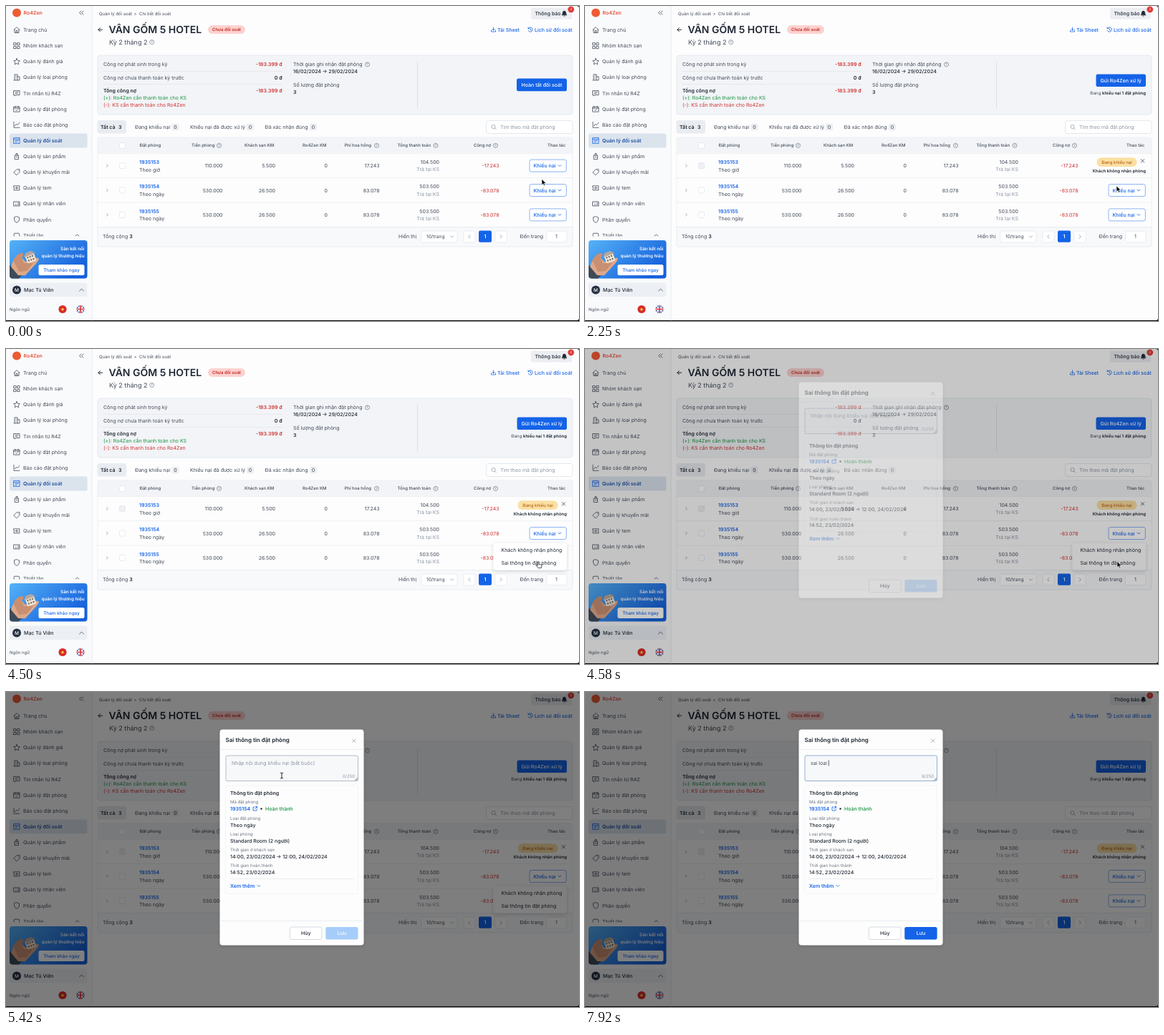
Write an HTML page that moves like this. It is 800 px wide and 441 px high and loops after 8000 ms.

```html
<!DOCTYPE html>
<html lang="vi">
<head>
<meta charset="utf-8">
<style>
html, body { margin: 0; width: 100%; height: 100%; overflow: hidden; background: #000; }
svg { display: block; width: 100%; height: 100%; }
text { font-family: Inter, "Noto Sans", sans-serif; white-space: pre; text-rendering: geometricPrecision; }
</style>
</head>
<body>
<svg id="stage" viewBox="0 0 800 441"></svg>
<script>
const INK = '#424a57', DARK = '#1f2733', BLUE = '#1463e8', RED = '#d0302f',
      GREY = '#8c95a3', GREEN = '#16913d', LINE = '#e1e5ea', SOFT = '#f2f4f7';

// Drawing helpers: each returns SVG markup. Text y is the middle of the capitals.
const text = (x, y, s, fill = INK, weight = 400, size = 7, anchor = 'start') =>
  `<text x="${x}" y="${y + size * .36}" fill="${fill}" font-weight="${weight}" font-size="${size}" text-anchor="${anchor}">${s}</text>`;
const right = (x, y, s, fill, weight, size) => text(x, y, s, fill, weight, size, 'end');
const mid = (x, y, s, fill, weight, size) => text(x, y, s, fill, weight, size, 'middle');
const bold = s => `<tspan font-weight="600" fill="${DARK}">${s}</tspan>`;
const box = (x1, y1, x2, y2, fill, stroke = 'none', r = 2.5, id) =>
  `<rect ${id ? `id="${id}"` : ''} x="${x1}" y="${y1}" width="${x2 - x1}" height="${y2 - y1}" rx="${r}" fill="${fill}" stroke="${stroke}" stroke-width=".7"/>`;
const path = (d, stroke = INK, w = .8, fill = 'none') =>
  `<path d="${d}" stroke="${stroke}" stroke-width="${w}" fill="${fill}" stroke-linecap="round" stroke-linejoin="round"/>`;
const shape = (d, fill) => path(d, 'none', 0, fill);
const dot = (x, y, r, fill, stroke = 'none') =>
  `<circle cx="${x}" cy="${y}" r="${r}" fill="${fill}" stroke="${stroke}" stroke-width=".7"/>`;
const at = (x, y, s, turn = 0) => `<g transform="translate(${x} ${y}) rotate(${turn})">${s}</g>`;
const group = (id, s) => `<g id="${id}">${s}</g>`;
const shaded = s => `<g filter="url(#shade)">${s}</g>`;
const down = (x, y, c = INK) => path(`M${x - 2} ${y - 1}l2 2 2-2`, c);
const cross = (x, y, c = INK, r = 2.2) => path(`M${x - r} ${y - r}l${2 * r} ${2 * r}m0 ${-2 * r}l${-2 * r} ${2 * r}`, c, .7);
const help = (x, y) => dot(x, y, 3, 'none', '#6b7482') + mid(x, y, '?', '#6b7482', 500, 4.5);
const hline = (x1, x2, y, c = LINE) => path(`M${x1} ${y}H${x2}`, c, .7);

const MENU = [
  ['Trang chủ', 'M-4 0L0-4 4 0M-3-1V4H3V-1M-1 4V1H1V4'],
  ['Nhóm khách sạn', 'M-4-4h3v3h-3zM1-4h3v3h-3zM-4 1h3v3h-3zM1 1h3v3h-3z'],
  ['Quản lý đánh giá', 'M0-4.3L1.3-1.5 4.3-1.1 2.1 1 2.7 4 0 2.6-2.7 4-2.1 1-4.3-1.1-1.3-1.5Z'],
  ['Quản lý loại phòng', 'M-3 4V-4H1V4M1-1H4V4H-4M-1-2v0M-1 0v0M-1 2v0'],
  ['Tin nhắn từ R4Z', 'M-4-3.5H4V2.5H-1L-3 4V2.5H-4ZM-2-1.5H2M-2 .5H1'],
  ['Quản lý đặt phòng', 'M-4-3H4V4H-4ZM-4-1H4M-2-4v2M2-4v2M-1.5 1.5l1 1 2-2'],
  ['Báo cáo đặt phòng', 'M-4-4V4H4M-2.5 1.5L-.5-1 1 .5 4-3'],
  ['Quản lý đối soát', 'M-4-4H4V4H-4ZM-4-1.8H4M-2 0H2M-2 2H0'],
  ['Quản lý sản phẩm', 'M-2.5-1.5H2.5V4H-2.5ZM-1-1.5V-4H1V-1.5M-1 1H1'],
  ['Quản lý khuyến mãi', 'M-4 0L0-4H4V0L0 4ZM2-2v0'],
  ['Quản lý tem', 'M-4-3H4V-1A1 1 0 0 0 4 1V3H-4V1A1 1 0 0 0-4-1ZM-1.5 0h3M0-1.5v3'],
  ['Quản lý nhân viên', 'M-4-3H4V3H-4ZM-2 1.5Q-1-.5 0 1.5M-1-1v0M1.5-1H3M1.5 1H3'],
  ['Phân quyền', 'M0-4.3L3.5-3V0Q3.5 3 0 4.3-3.5 3-3.5 0V-3Z'],
  ['Thiết lập', 'M-3-3H3L4 0 3 3H-3L-4 0Z']
];

function banner() {
  const windows = [-4.5, -1, 2.5].map(x => box(x, 1, x + 1.8, 3.2, '#6b625e', 'none', 0) + box(x, 5.5, x + 1.8, 7.7, '#6b625e', 'none', 0)).join('');
  const house = box(-6.5, -1, 6.5, 10, '#efe3d3', 'none', 0) + shape('M-8.5 0L-4-5H4L8.5 0Z', '#b9a79b') + windows;
  return box(5, 328, 113.5, 381.5, 'url(#sky)', 'none', 4) +
    shape('M5 364L13 361 23 376 18 381.5H9Q5 381 5 377Z', '#3f4a58') +
    shape('M7 365Q10 352 20 350L27 358 39 354Q45 351 46 354 45 358 38 365L27 377 17 377Z', '#dda88a') +
    at(33, 349, house, -20) + shape('M10 356Q16 345 23 346 26 347 22 353L25 360 38 360 29 371 18 372Z', '#c98f72') +
    right(109.5, 340, 'Sàn kết nối', '#fff', 600, 6.3) +
    right(109.5, 350, 'quản lý thương hiệu', '#fff', 600, 6.3) +
    box(45.5, 362, 109.5, 377, '#fff') + mid(77.5, 369.5, 'Tham khảo ngay', BLUE, 500, 6.4);
}

function sidebar() {
  let s = box(0, 0, 120, 440, '#f9fafb', 'none', 0) + path('M120 0V440', LINE) +
    dot(15, 9.5, 6, '#ee5a33') + text(24.5, 9.5, 'Ro4Zen', '#e5533d', 600) +
    path('M105 7l-2.5 2.5 2.5 2.5M108 7l-2.5 2.5 2.5 2.5') +
    box(5, 178.5, 113.5, 198.5, '#dbe3ed');
  MENU.forEach(([label, icon], i) => {
    const y = 33.5 + i * 22.13, on = i == 7;
    s += at(15, y, path(icon, on ? BLUE : INK)) + text(24, y, label, on ? '#1c4f9f' : INK, on ? 600 : 400);
  });
  return s + path('M97 322l2.5-2 2.5 2') + box(1, 322.5, 119, 328, '#f9fafb', 'none', 0) + banner() +
    box(5, 387.5, 113.5, 407, '#eceff4', 'none', 3) + dot(15, 397.5, 6, '#253040') +
    mid(15, 397.5, 'M', '#fff', 500, 6.5) + text(25, 397.5, 'Mạc Tú Viên', DARK, 500) +
    path('M102.5 399l3-3 3 3') + text(5, 425, 'Ngôn ngữ', INK, 400, 6) +
    dot(79, 424.5, 5.6, '#d92b2b') + shape('M79 422.2l.7 1.6 1.7.1-1.3 1.1.4 1.7-1.5-.9-1.5.9.4-1.7-1.3-1.1 1.7-.1Z', '#ffdc3c') +
    dot(104, 424.5, 5.6, '#2b4ea2') + path('M100.5 421l7 7m0-7l-7 7', '#fff', 1.6) +
    path('M104 419.5v10m-5-5h10', '#fff', 3) + path('M104 419.5v10m-5-5h10', '#d9313c', 1.6);
}

function header() {
  return text(130, 11, 'Quản lý đối soát', INK, 400, 6) + text(178.5, 11, '&gt;', INK, 400, 6) +
    text(186, 11, 'Chi tiết đối soát', INK, 400, 6) +
    box(733, 2.5, 790, 18.5, '#eceef2') + text(738.5, 10.7, 'Thông báo', DARK, 500) +
    path('M776.3 12.5Q777.3 11.5 777.3 9.5 777.3 7 779.5 7 781.7 7 781.7 9.5 781.7 11.5 782.7 12.5ZM778.7 14h1.6', DARK, .7, DARK) +
    dot(788.8, 4.8, 4.4, '#e23b35') + mid(788.8, 4.8, '2', '#fff', 400, 4.5) +
    path('M134.5 33.2h-5.5m2.5-2.6l-2.6 2.6 2.6 2.6', DARK, 1) +
    text(143.5, 33, 'VÂN GỐM 5 HOTEL', DARK, 600, 14) +
    box(282, 27, 334, 39, '#fbd2d0', 'none', 6) + mid(308, 33, 'Chưa đối soát', '#c9291f', 600, 6) +
    text(144, 50.3, 'Kỳ 2 tháng 2', INK, 400, 9) + help(203.7, 50.5) +
    path('M680.5 30v4m-1.8-1.7l1.8 1.8 1.8-1.8M677.5 34v2h6v-2', BLUE) + text(686, 33.2, 'Tải Sheet', BLUE, 500) +
    path('M729.5 31.2A3.2 3.2 0 1 1 729.3 34.5M729 29.8v1.8h1.8M732.3 31.5v2l1.3.8', BLUE) +
    text(738, 33.2, 'Lịch sử đối soát', BLUE, 500);
}

function summary() {
  return box(128, 69, 791, 152, SOFT, '#dce2e9', 4) +
    text(136, 81.6, 'Công nợ phát sinh trong kỳ') + right(385.5, 81.6, '-183.399 đ', RED, 600) + hline(136, 385, 91.5) +
    text(136, 100.2, 'Công nợ chưa thanh toán kỳ trước') + right(385.5, 100.2, '0 đ', DARK, 600) + hline(136, 385, 109.5) +
    text(136, 118.7, 'Tổng công nợ', DARK, 600) + right(385.5, 118.7, '-183.399 đ', RED, 600) +
    text(136, 128.7, '(+): Ro4Zen cần thanh toán cho KS', GREEN) +
    text(136, 138.7, '(-): KS cần thanh toán cho Ro4Zen', RED) +
    text(401, 81.6, 'Thời gian ghi nhận đặt phòng') + help(504.5, 81.8) +
    text(401, 91.9, '16/02/2024 → 29/02/2024', DARK, 500) +
    text(401, 110.3, 'Số lượng đặt phòng') + text(401, 120.2, '3', DARK, 600) +
    path('M574.5 78V143', '#d5dbe3', .8) +
    group('finish', box(713, 101.5, 783, 119.2, BLUE) + mid(748, 110.3, 'Hoàn tất đối soát', '#fff', 500)) +
    group('send', box(713.5, 95.5, 783, 113, BLUE) + mid(748.2, 104.3, 'Gửi Ro4Zen xử lý', '#fff', 500) +
      right(783, 121.5, 'Đang ' + bold('khiếu nại 1 đặt phòng'), INK, 400, 6));
}

function tabs() {
  const tab = (x, label, n) => text(x, 169.5, label) + box(n - 5, 164.5, n + 5, 174.5, '#eceef2') + mid(n, 169.5, '0');
  return box(127.5, 160, 168, 178.5, '#e9ecf0', 'none', 3) +
    text(132, 169.5, 'Tất cả', DARK, 600) + text(157, 169.5, '3', DARK, 600) +
    tab(180, 'Đang khiếu nại', 236.5) + tab(257, 'Khiếu nại đã được xử lý', 341) + tab(361.5, 'Đã xác nhận đúng', 429) +
    box(670.5, 160.5, 791, 178.5, '#fff', '#d9dee5', 3) + dot(680.5, 169, 2.6, 'none', GREY) +
    path('M682.5 171l1.8 1.8', GREY) + text(690, 169.5, 'Tìm theo mã đặt phòng', GREY);
}

const rowY = i => 223.6 + i * 34.4;
const action = (y, id) => box(731, y - 8.5, 782.3, y + 8.5, '#fff', '#5b93f0', 2.5, id) +
  text(736.5, y, 'Khiếu nại', BLUE, 500) + down(773, y, BLUE);
const check = (y, id) => box(158.5, y - 4, 166.5, y + 4, '#fff', '#dfe4ea', 1.5, id);

function row(i, id, kind, price, promo, fee, total, debt) {
  const y = rowY(i);
  const fields = [[302.5, price], [376, promo], [449, '0'], [521.5, fee]].map(([x, s]) => right(x, y, s)).join('');
  return box(128.4, y - 16.8, 790.6, y + 17.2, '#fdfdfe', 'none', 0, 'row' + i) + hline(128, 791, y + 17.2) +
    path(`M140.5 ${y - 1.8}l1.8 1.8-1.8 1.8`, GREY) + check(y, 'check' + i) +
    text(186, y - 5.1, id, BLUE, 600) + text(186, y + 5.4, kind) + fields +
    right(605, y - 5.1, total) + right(605, y + 5, 'Trả tại KS', GREY) + right(688.5, y, debt, RED) +
    group('act' + i, action(y, 'btn' + i));
}

function table() {
  const heads = [[186.5, 'Đặt phòng'], [259, 'Tiền phòng', 297.5], [333, 'Khách sạn KM'], [414, 'Ro4Zen KM'],
    [472.5, 'Phí hoa hồng', 517.5], [546.5, 'Tổng thanh toán', 600], [653, 'Công nợ', 683.5], [756, 'Thao tác']];
  const page = (x, d) => box(x, 315, x + 16, 331, '#fff', LINE) + path(d, GREY);
  return box(128, 184, 791, 337, '#f8f9fb', LINE, 3) + box(128.4, 184.4, 790.6, 207, SOFT, 'none', 2) + hline(128, 791, 206.8) +
    check(195.5) + heads.map(([x, s, q]) => text(x, 195.3, s, INK, 500, 6) + (q ? help(q, 195.3) : '')).join('') +
    row(0, '1935153', 'Theo giờ', '110.000', '5.500', '17.243', '104.500', '-17.243') +
    row(1, '1935154', 'Theo ngày', '530.000', '26.500', '83.078', '503.500', '-83.078') +
    row(2, '1935155', 'Theo ngày', '530.000', '26.500', '83.078', '503.500', '-83.078') +
    group('claimed', box(714.5, 212.3, 770.5, 225, '#fbe0a3', 'none', 6) + mid(742.5, 218.5, 'Đang khiếu nại', '#b8621b', 500, 6) +
      cross(778.5, 216.8, DARK) + right(783, 230.5, 'Khách không nhận phòng', DARK, 600, 6)) +
    text(135, 322.7, 'Tổng cộng ' + bold('3')) + text(548, 322.7, 'Hiển thị') +
    box(579.5, 315, 630, 331, '#fff', LINE) + text(587, 322.7, '10/trang', INK, 400, 6.6) + down(622.5, 323, GREY) +
    page(639, 'M648 320.5l-2.3 2.3 2.3 2.3') + box(660, 314.5, 678, 330.7, BLUE, 'none', 2) + mid(669, 322.7, '1', '#fff', 600) +
    page(683, 'M690 320.5l2.3 2.3-2.3 2.3') + text(717.5, 322.7, 'Đến trang') +
    box(754.5, 315.3, 783, 330.5, '#fff', LINE) + mid(768.5, 322.7, '1');
}

const menu = shaded(box(680.5, 237.5, 783, 275, '#fff', 'none', 3)) +
  text(691.5, 247.3, 'Khách không nhận phòng', DARK) + text(691.5, 265.5, 'Sai thông tin đặt phòng', DARK);

function dialog() {
  const field = (y, label, value) => text(313, y, label, '#6b7482', 400, 6) + text(313, y + 9.4, value, DARK, 500);
  return shaded(box(298.5, 52.5, 499.5, 354.5, '#fdfdfd', 'none', 4)) +
    text(306.5, 66.7, 'Sai thông tin đặt phòng', DARK, 600, 8) + cross(485.7, 68.2, GREY) + hline(298.5, 499.5, 80.5) +
    box(307, 89, 491.5, 124.5, '#f6f8fa', '#97a1af', 2, 'area') +
    `<text id="note" x="315" y="102" font-size="7"></text>` + box(315, 95.5, 315.7, 103.5, DARK, 'none', 0, 'caret') +
    `<text id="count" x="487" y="120.2" font-size="6" fill="${GREY}" text-anchor="end"></text>` +
    path('M487.5 123.5l3-3m-1 3l1-1', DARK, .6) +
    box(306.5, 131, 491.5, 282.5, 'none', '#eef0f3', 3) + text(313, 141.3, 'Thông tin đặt phòng', DARK, 600) +
    field(154, 'Mã đặt phòng', `<tspan fill="${BLUE}" font-weight="600">1935154</tspan>`) +
    path('M347 161h-2v5h5v-2M347.5 163.5l3-3m-2 0h2v2', BLUE) + dot(356.5, 163.5, 1.2, DARK) +
    text(362, 163.4, 'Hoàn thành', GREEN, 500) +
    field(177, 'Loại đặt phòng', 'Theo ngày') + field(199, 'Loại phòng', 'Standard Room (2 người)') +
    field(221, 'Thời gian ở khách sạn', '14:00, 23/02/2024 → 12:00, 24/02/2024') +
    field(243.3, 'Thời gian hoàn thành', '14:52, 23/02/2024') + hline(313, 485, 261.5) +
    text(313, 271.5, 'Xem thêm', BLUE, 600) + down(353, 271.5, BLUE) + hline(298.5, 499.5, 320.5) +
    box(396.3, 329, 441, 346.5, '#fff', '#c3cad4') + mid(418.7, 337.7, 'Hủy', DARK, 500) +
    box(446.3, 329, 491.5, 346.5, '#a6cdfa') + group('save', box(446.3, 329, 491.5, 346.5, BLUE)) +
    mid(469, 337.7, 'Lưu', '#fff', 500);
}

const stage = document.getElementById('stage');
stage.innerHTML = `<defs>
  <linearGradient id="sky" x2="1" y2=".6"><stop stop-color="#55b2f6"/><stop offset="1" stop-color="#1560dc"/></linearGradient>
  <filter id="shade" x="-20%" y="-30%" width="140%" height="170%"><feDropShadow dx="0" dy="1.5" stdDeviation="2.5" flood-opacity=".16"/></filter></defs>` +
  box(0, 0, 800, 440, '#fdfdfe', 'none', 3) + sidebar() + header() + summary() + tabs() + table() + group('menu', menu) +
  box(0, 0, 800, 441, 'rgba(0,0,0,.5)', 'none', 0, 'veil') + group('dialog', dialog()) +
  group('arrow', path('M0 0V8L1.9 6.3 3.1 9 4.5 8.4 3.3 5.8H5.8Z', '#fff', .6, '#000')) +
  group('hand', path('M-.9.8C-.9-.3.9-.3.9.8V3.6L4 4.3Q5.1 4.6 4.9 5.8L4.4 8.8H-.1L-2.8 5.6C-3.3 4.9-2.4 4.2-1.8 4.7L-.9 5.5Z', '#111', .7, '#fff')) +
  group('beam', path('M-1.6-4Q0-4 0-3V3Q0 4-1.6 4M1.6-4Q0-4 0-3M0 3Q0 4 1.6 4', '#111', .9));

const el = {};
stage.querySelectorAll('[id]').forEach(n => el[n.id] = n);

const TRACK = [[0, 748, 242.5], [120, 748, 242.5], [520, 756, 224], [860, 756, 224], [1200, 733.5, 249.7], [1800, 733.5, 249.7],
  [2250, 742, 252], [2900, 758.5, 261.5], [3750, 758.5, 261.5], [4300, 743, 297.7], [4800, 743, 297.7], [5330, 385, 117], [8000, 385, 117]];
const POINTER = [[0, 'arrow'], [350, 'hand'], [1850, 'arrow'], [2650, 'hand'], [4560, 'arrow'], [5230, 'beam'], [6830, '']];
const TYPED = [[0, ''], [6830, 's'], [7000, 'sa'], [7250, 'sai'], [7420, 'sai '], [7500, 'sai l'], [7580, 'sai lo'],
  [7670, 'sai loa'], [7750, 'sai loạ'], [7830, 'sai loại'], [7910, 'sai loại ']];

const ramp = (t, a, b) => Math.min(1, Math.max(0, (t - a) / (b - a)));
const pulse = (t, a, b, fade = 150) => ramp(t, a, a + fade) * (1 - ramp(t, b, b + fade));
const ease = u => 1 - (1 - u) ** 2.3;
const latest = (keys, t) => keys.filter(k => k[0] <= t).pop();
const show = (n, on) => n.style.opacity = +on;
const mix = (a, b, u) => `rgb(${a.map((v, i) => v + (b[i] - v) * u)})`;
const PAPER = [253, 253, 254], WHITE = [255, 255, 255];

function movePointer(t) {
  const i = Math.max(1, TRACK.findIndex(k => k[0] > t));
  const [a, x, y] = TRACK[i - 1], [b, x2, y2] = TRACK[i];
  const u = ramp(t, a, b), s = u * u * (3 - 2 * u), current = latest(POINTER, t)[1];
  for (const name of ['arrow', 'hand', 'beam']) {
    show(el[name], name == current);
    el[name].setAttribute('transform', `translate(${x + (x2 - x) * s} ${y + (y2 - y) * s})`);
  }
}

function draw(t) {
  const claimed = t >= 1850, second = t > 2500;
  show(el.finish, !claimed);
  show(el.send, claimed);
  show(el.act0, !claimed);
  show(el.claimed, claimed);
  el.check0.setAttribute('fill', claimed ? '#eef0f3' : '#fff');

  el.row0.setAttribute('fill', mix(PAPER, [243, 245, 248], pulse(t, 250, 1300)));
  el.row1.setAttribute('fill', mix(PAPER, [237, 241, 247], pulse(t, 2450, 4050)));
  el.btn0.setAttribute('fill', mix(WHITE, [184, 214, 249], pulse(t, 350, 1300)));
  el.btn1.setAttribute('fill', mix(WHITE, [222, 235, 252], pulse(t, 2700, 4050)));

  show(el.menu, second ? pulse(t, 3600, 6020) : pulse(t, 750, 1680));
  el.menu.setAttribute('transform', `translate(0 ${second ? 34.4 : 0})`);

  // The veil darkens at once; the dialog drops in over it.
  const open = ease(ramp(t, 4520, 4820));
  show(el.veil, ramp(t, 4520, 4660));
  show(el.dialog, open);
  el.dialog.setAttribute('transform', `translate(0 ${-10 * (1 - open)})`);

  const [since, typed] = latest(TYPED, t);
  el.note.textContent = typed || 'Nhập nội dung khiếu nại (bắt buộc)';
  el.note.setAttribute('fill', typed ? INK : GREY);
  el.count.textContent = typed.length + '/250';
  el.caret.setAttribute('x', 315 + (typed ? el.note.getComputedTextLength() : 0));
  const focus = 5950;
  show(el.caret, t > focus && (t - Math.max(since, focus)) % 1000 < 500);
  el.area.setAttribute('stroke', t > focus ? '#6a8cbd' : '#97a1af');
  show(el.save, ramp(t, 6830, 7060));
  movePointer(t);
}

function tick() {
  draw(performance.now() % 8000);
  requestAnimationFrame(tick);
}
tick();
</script>
</body>
</html>
```
